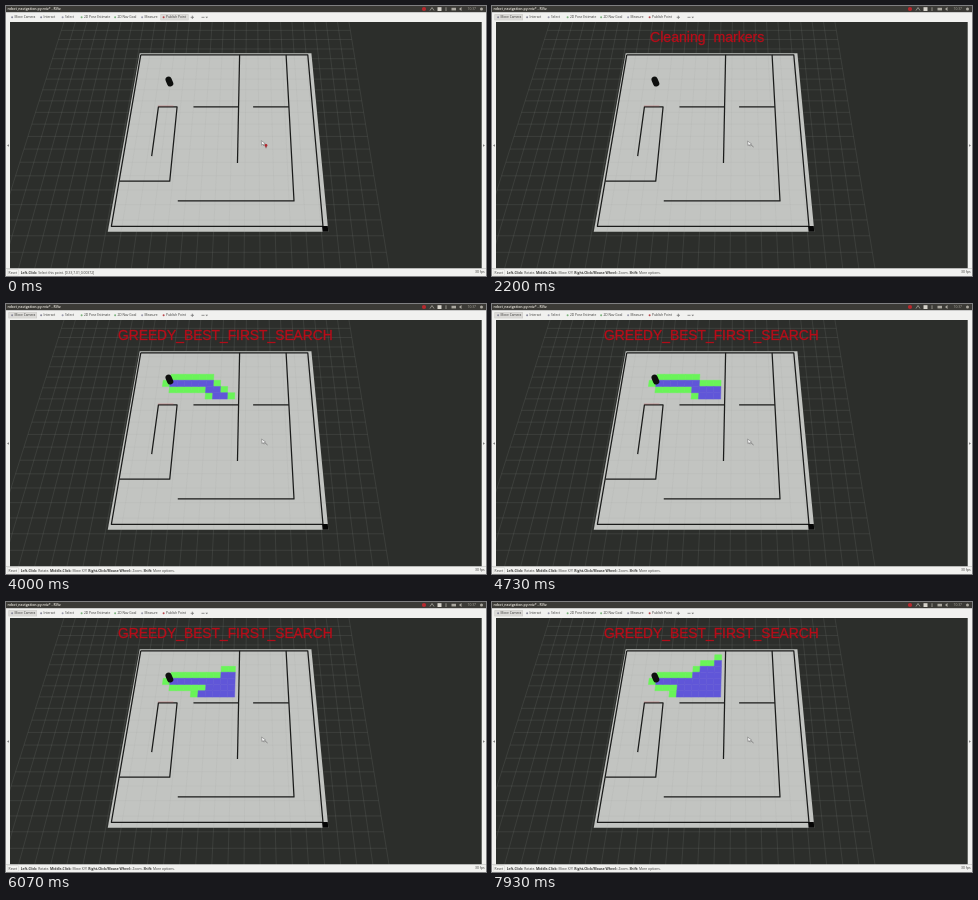
These frames come from a looping animation (480x270 px, 8 s). An HTML page with a canvas:

```html
<!DOCTYPE html>
<html lang="en">
<head>
<meta charset="utf-8">
<title>Greedy search on a grid map</title>
<style>
html, body { margin: 0; width: 100%; height: 100%; overflow: hidden; background: #2c2e2b; }
canvas { display: block; width: 100vw; height: 100vh; filter: blur(0.35px); }
</style>
</head>
<body>
<canvas id="stage" width="480" height="270"></canvas>
<script>
const ctx = document.getElementById('stage').getContext('2d');
const LOOP = 8000, TOOL_SWITCH = 1270, CLEAN_AT = 1800, SEARCH_AT = 2330;
const FIRST_STEP = 2170, STEP = 198, MAX_STEPS = 29;
const UI = '"Open Sans", "Noto Sans", sans-serif';
const BAR = '#f1f1ef', INK = '#3a3a38';

// Ground plane in perspective: columns meet at VP, rows are even in 1 / (y - VP.y).
// Map units are search cells, counted from the far left corner of the map.
const VP = { x: 246, y: -581 };
const SIZE = 25;
const START = { x: 5, y: 5 }, GOAL = { x: 18, y: 13 }, ROOM = { right: 13, bottom: 7 };

function project(a, b) {
  const depth = 1 / (0.0015919 - b * 0.0000141);
  return [VP.x + (a * 0.010935 - 0.17878) * depth, VP.y + depth];
}

const projectAll = points => points.flatMap(([a, b]) => project(a, b));
const box = (l, t, r, b) => projectAll([[l, t], [r, t], [r, b], [l, b]]);

const walls = [
  [[0.2, 0.3], [24.45, 0.3], [24.45, 24.4], [0.3, 24.4], [0.2, 0.3]],
  [[21.3, 0.3], [21.3, 21.5], [7.6, 21.5]],
  [[14.55, 0.3], [14.55, 16.8]],
  [[8.5, 8.9], [14.55, 8.9]],
  [[16.5, 8.9], [21.3, 8.9]],
  [[3.8, 15.9], [3.8, 8.9], [6.3, 8.9], [6.4, 19.1], [0.3, 19.1]]
];

function rect(x, y, w, h, color) {
  ctx.fillStyle = color;
  ctx.fillRect(x, y, w, h);
}

function tracePath(p) {
  ctx.beginPath();
  for (let i = 0; i < p.length; i += 2) ctx.lineTo(p[i], p[i + 1]);
}

function fillPoly(p, color) {
  tracePath(p);
  ctx.fillStyle = color;
  ctx.fill();
}

function strokePoly(p, color, width) {
  tracePath(p);
  ctx.strokeStyle = color;
  ctx.lineWidth = width;
  ctx.stroke();
}

function dot(x, y, r, color) {
  ctx.beginPath();
  ctx.arc(x, y, r, 0, 7);
  ctx.fillStyle = color;
  ctx.fill();
}

function label(text, x, y, size, color, weight = 400, family = UI) {
  ctx.font = `${weight} ${size}px ${family}`;
  ctx.fillStyle = color;
  ctx.fillText(text, x, y);
  return x + ctx.measureText(text).width;
}

// Greedy best-first search: always expand the open cell nearest to the goal.
function search(steps) {
  const open = [{ ...START, cost: 0 }], closed = [], seen = new Set();
  while (closed.length < steps) {
    open.sort((p, q) => p.cost - q.cost || q.y - p.y);
    const cell = open.shift();
    closed.push(cell);
    for (const [dx, dy] of [[0, 1], [1, 0], [0, -1], [-1, 0]]) {
      const x = cell.x + dx, y = cell.y + dy, key = `${x},${y}`;
      const isStart = x === START.x && y === START.y;
      if (x > ROOM.right || y > ROOM.bottom || isStart || seen.has(key)) continue;
      seen.add(key);
      open.push({ x, y, cost: (GOAL.x - x) ** 2 + (GOAL.y - y) ** 2 });
    }
  }
  return { open, closed };
}

function drawGrid() {
  const left = -12.45, right = 31.2, gap = (right - left) / 25;
  const far = -6, near = 29;
  const line = (a, b, c, d) =>
    strokePoly([...project(a, b), ...project(c, d)], 'rgba(112,116,112,0.34)', 0.7);
  for (let a = left; a < right + 0.1; a += gap) line(a, far, a, near);
  for (let b = far; b < near; b += gap) line(left, b, right, b);
}

function drawMap() {
  const sheet = box(0, 0, SIZE, SIZE);
  drawGrid();
  fillPoly(sheet, '#c2c4c1');
  ctx.save();
  tracePath(sheet);
  ctx.clip();
  ctx.globalAlpha = 0.25;
  drawGrid();
  ctx.restore();
  ctx.lineJoin = 'round';
  for (const wall of walls) strokePoly(projectAll(wall), '#1a1b1a', 1.25);
  strokePoly(projectAll([[3.7, 8.75], [5.8, 8.75]]), 'rgba(190,90,95,0.5)', 0.8);
  fillPoly(box(24.35, 24.35, SIZE, SIZE), '#050505');
}

function drawCells(cells, color) {
  for (const { x, y } of cells) {
    const p = box(x, y, x + 1, y + 1);
    fillPoly(p, color);
    strokePoly([...p, p[0], p[1]], color, 0.5);
  }
}

function drawSearch(t) {
  if (t < SEARCH_AT) return;
  const steps = Math.min(MAX_STEPS, 1 + Math.floor((t - FIRST_STEP) / STEP));
  const { open, closed } = search(steps);
  drawCells(open, '#69f458');
  drawCells(closed, '#6056d8');
}

function drawRobot() {
  ctx.lineCap = 'round';
  strokePoly([162.6, 73.7, 164.2, 77.4], '#0e0f0e', 6.2);
  ctx.lineCap = 'butt';
}

function drawBanner(t) {
  if (t < CLEAN_AT) return;
  const [text, size] = t < SEARCH_AT ? ['Cleaning\u00a0\u00a0markers', 14.1] : ['GREEDY_BEST_FIRST_SEARCH', 13.8];
  const x = t < SEARCH_AT ? 158 : 112;
  label(text, x, 35.5, size, '#b80d19', 400, '"Liberation Sans", Arial, sans-serif');
  ctx.strokeStyle = 'rgba(184,13,25,0.55)';
  ctx.lineWidth = 0.5;
  ctx.strokeText(text, x, 35.5);
}

function drawCursor(picking, move) {
  ctx.save();
  ctx.translate(255.3 + 0.3 * move, 134.6 + 0.4 * move);
  const arrow = [0,0, 0.3,4.6, 1.5,3.6, 2.4,5.2, 2.6,3.3, 4,3, 0,0];
  fillPoly(arrow, '#f4f4f4');
  strokePoly(arrow, '#666', 0.5);
  if (picking) {
    dot(4.7, 4.8, 1.4, '#b3252c');
    strokePoly([4.7, 5.5, 4.7, 7.6], '#7d2a2e', 0.8);
  } else {
    strokePoly([3.5, 4, 6, 6], '#777', 0.8);
  }
  ctx.restore();
}

function drawTitleBar() {
  const gray = '#aaa79f';
  rect(0, 0, 480, 6.2, '#3b3a36');
  label('robot_navigation.py.rviz* - RViz', 1.5, 4.2, 3.45, '#d0cdc5', 700);
  dot(418, 3, 2.1, '#b8282d');
  strokePoly([424, 4.5, 426, 1.5, 428, 4.5], gray, 0.8);
  rect(431.5, 1.2, 4, 3.8, '#d5d2ca');
  strokePoly([440, 1.3, 440, 5], gray, 0.8);
  rect(445.5, 1.8, 4.5, 2.6, gray);
  fillPoly([453, 3, 455.5, 1, 455.5, 5], gray);
  label('10:37', 461.5, 4.2, 3.3, gray);
  dot(475.5, 3, 1.5, gray);
}

function drawToolbar(picking) {
  rect(0, 6.2, 480, 9.8, BAR);
  const [x, w] = picking ? [154.5, 28] : [2.5, 28.5];
  rect(x, 8.3, w, 6, '#c4c3c0');
  rect(x + 0.4, 8.7, w - 0.8, 5.2, '#dcdbd8');
  const tools = [
    ['Move Camera', 8.5, '#889'], ['Interact', 37.5, '#889'], ['Select', 59, '#99a'],
    ['2D Pose Estimate', 78, '#79b27b'], ['2D Nav Goal', 111.5, '#79b27b'],
    ['Measure', 138.5, '#99a'], ['Publish Point', 160, '#b8484d']
  ];
  for (const [name, left, color] of tools) {
    dot(left - 2.4, 11.2, 1, color);
    label(name, left, 12.4, 3.25, INK);
  }
  strokePoly([184.7, 11.3, 188, 11.3], '#777', 0.8);
  strokePoly([186.35, 9.7, 186.35, 12.9], '#777', 0.8);
  strokePoly([195.5, 11.3, 198.5, 11.3], '#777', 0.8);
  fillPoly([199.5, 10.7, 202, 10.7, 200.75, 12.2], '#777');
}

function drawStatus(picking, move) {
  rect(0, 262.3, 480, 7.7, BAR);
  rect(1, 263.5, 11.5, 5.8, '#d2d1ce');
  rect(1.4, 263.9, 10.7, 5, '#f5f5f3');
  label('Reset', 2.6, 267.7, 3.3, INK);
  const z = move > 0.5 ? '-0.000372' : '0.00372';
  const point = `${(0.33 + 0.01 * move).toFixed(2)},${(7.01 + 0.06 * move).toFixed(2)},${z}`;
  const parts = picking
    ? ['Left-Click:', ` Select this point. [${point}]`]
    : ['Left-Click:', ' Rotate. ', 'Middle-Click:', ' Move X/Y. ',
       'Right-Click/Mouse Wheel:', ': Zoom. ', 'Shift:', ' More options.'];
  let x = 14.7;
  parts.forEach((part, i) => { x = label(part, x, 267.7, 3.35, INK, i % 2 ? 400 : 700); });
  label('30 fps', 469, 267.2, 3.4, INK);
}

function drawSides() {
  rect(0, 16, 4, 246.5, BAR);
  rect(475.7, 16, 4.3, 246.5, BAR);
  fillPoly([1.2, 139.5, 2.8, 138.3, 2.8, 140.7], '#666');
  fillPoly([478.8, 139.5, 477.2, 138.3, 477.2, 140.7], '#666');
}

function draw(t) {
  const move = Math.min(1, Math.max(0, (t - 70) / 660));
  const picking = t < TOOL_SWITCH;
  rect(0, 0, 480, 270, '#2c2e2b');
  drawMap();
  drawSearch(t);
  drawRobot();
  drawBanner(t);
  drawCursor(picking, move);
  drawSides();
  drawTitleBar();
  drawToolbar(picking);
  drawStatus(picking, move);
}

const start = performance.now();
function tick() {
  draw((performance.now() - start) % LOOP);
  requestAnimationFrame(tick);
}
tick();
</script>
</body>
</html>
```
